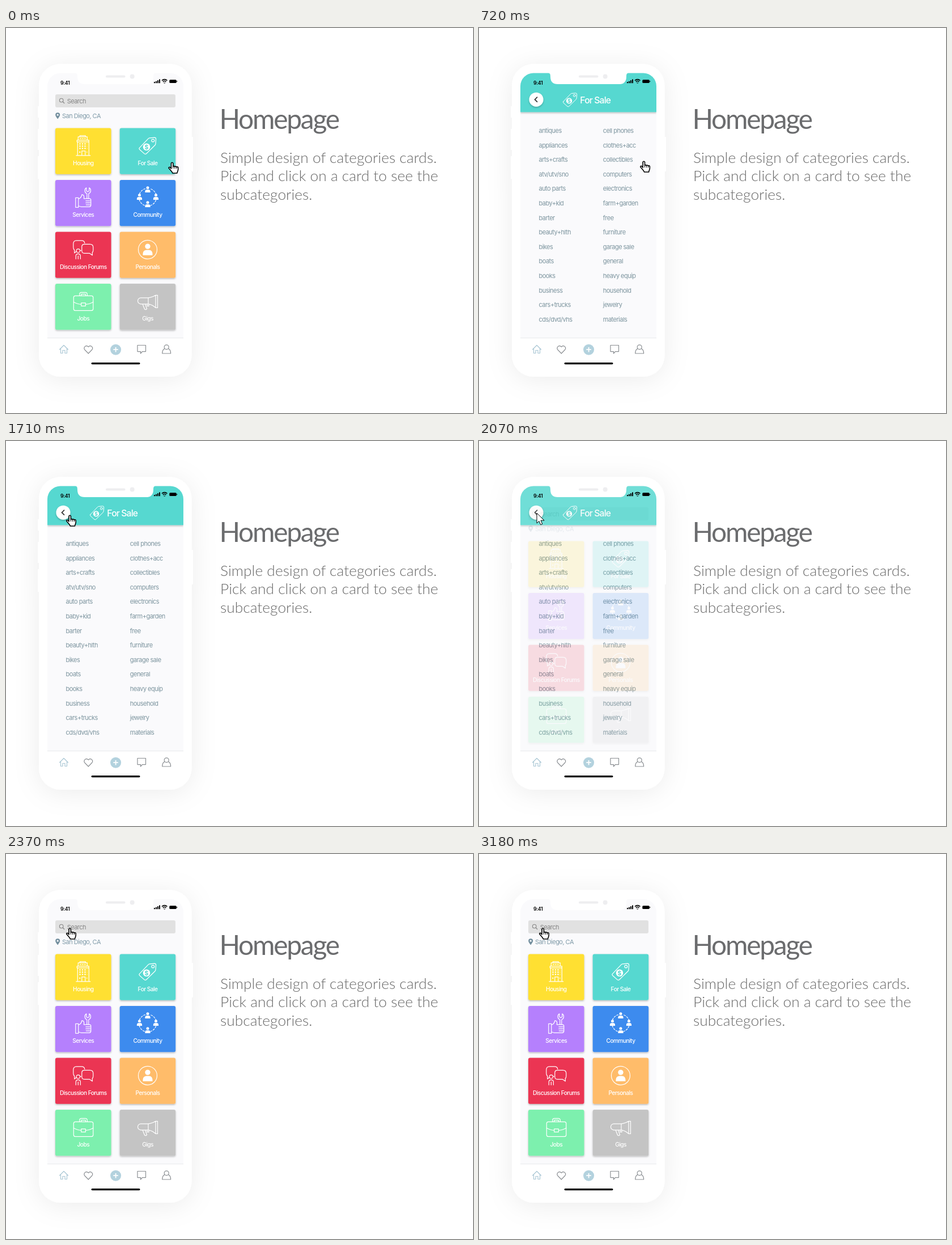
An HTML page for the animation above (3210 ms loop, 824 px wide and 679 px high).

```html
<!DOCTYPE html>
<html lang="en">
<head>
<meta charset="utf-8">
<title>Homepage</title>
<style>
html, body { margin: 0; width: 100%; height: 100%; overflow: hidden; background: #fff; }
svg { display: block; width: 824px; height: 679px; }
text { font-family: Inter, "Liberation Sans", sans-serif; }
.small { font-size: 11px; letter-spacing: -.53px; }
.item { fill: #7d959f; }
.label { font-size: 10.2px; letter-spacing: -.57px; font-weight: 500; fill: #fff; text-anchor: middle; }
.title { font: 400 48px Lato, sans-serif; letter-spacing: -2.3px; fill: #6b6c6e; }
.copy { font: 300 26.4px Lato, sans-serif; fill: #686868; }
.line { fill: none; stroke: #fff; stroke-width: 1.2; stroke-linejoin: round; stroke-linecap: round; }
.tab { fill: none; stroke: #8b8f93; stroke-width: 1.2; stroke-linejoin: round; stroke-linecap: round; }
.solid { fill: #fff; stroke: none; }
.cursor { fill: #fff; stroke: #000; stroke-linejoin: round; stroke-linecap: round; }
</style>
</head>
<body>
<svg viewBox="0 0 824 679">
  <defs>
    <filter id="glow" x="-35%" y="-20%" width="170%" height="140%">
      <feDropShadow dx="0" dy="5" stdDeviation="23" flood-color="#000" flood-opacity=".075"/>
    </filter>
    <filter id="lift" x="-20%" y="-20%" width="140%" height="150%">
      <feDropShadow dx="0" dy="1.5" stdDeviation="1.4" flood-color="#000" flood-opacity=".28"/>
    </filter>
    <clipPath id="screen"><path d="M73 610V102.5a23 23 0 0 1 23-23H290a23 23 0 0 1 23 23V610z"/></clipPath>
    <g id="person"><circle cy="-3.6" r="2.5"/><path d="M-4.6 4.8V3.2a3.4 3.4 0 0 1 3.4-3.4H1.2A3.4 3.4 0 0 1 4.6 3.2V4.8z"/></g>
    <g id="tag">
      <path class="line" d="M-14.5 3.5L1-12.6Q2-13.8 3.6-13.9L12-14.6Q14.6-14.6 14.6-12L14-3.8Q13.9-2.2 12.8-1L-2.5 14Q-4.2 15.4-6 13.8L-14.3 6.4Q-15.6 5-14.5 3.5z"/>
      <circle class="line" cx="9.3" cy="-9.3" r="2.4"/>
      <circle class="solid" cx="-2" cy="2" r="6.3"/>
      <text x="-2" y="5.8" font-size="10.5" font-weight="700" text-anchor="middle" fill="#56d8d0">$</text>
    </g>
  </defs>

  <rect width="824" height="679" fill="#fff"/>
  <g filter="url(#glow)" fill="#fff">
    <rect x="58" y="63.5" width="269.5" height="551.5" rx="38"/>
    <rect x="56" y="138" width="4" height="20" rx="1.5"/>
    <rect x="56" y="178" width="4" height="37" rx="1.5"/>
    <rect x="56" y="226" width="4" height="40" rx="1.5"/>
    <rect x="326" y="192" width="4" height="61" rx="1.5"/>
  </g>

  <g clip-path="url(#screen)">
    <g id="home"></g>
    <g id="list"></g>
    <rect x="73" y="546" width="240" height="1.4" fill="#ebecee"/>
    <rect x="73" y="547.4" width="240" height="60" fill="#fff"/>
  </g>

  <path d="M121 79C125 79 126 81 126 86Q126 99 139 99H247Q260 99 260 86C260 81 261 79 265 79z" fill="#fff"/>
  <rect x="176" y="83.5" width="34.5" height="4" rx="2" fill="#eeeef0"/>
  <circle cx="222.7" cy="85.5" r="4" fill="#eeeef0"/>
  <text x="96" y="100.3" font-size="8.8" font-weight="600" letter-spacing="-.3">9:41</text>
  <path d="M261 95h2v2.2h-2zM264 93.7h2v3.5h-2zM267 92.2h2v5h-2zM270 90.5h2v6.7h-2z"/>
  <g fill="none" stroke="#000" stroke-width="1.5">
    <path d="M275 92.6Q279.7 88.6 284.4 92.6M276.8 94.8Q279.7 92.3 282.6 94.8"/>
    <path d="M278.2 96L279.7 97.6 281.2 96" stroke-width="1"/>
  </g>
  <rect x="288.3" y="91.2" width="12.4" height="5.7" rx="1.5"/>
  <rect x="301.2" y="93" width="1" height="2.2" rx=".5"/>

  <g class="tab">
    <path d="M94.5 567L102 559.5 109.5 567M96.5 565.5V573.5H100V568.5H104V573.5H107.5V565.5" stroke="#aac7d5"/>
    <path d="M145.3 574L139 567.5C135.8 563.5 141.5 557.5 145.3 562.5 149.1 557.5 154.8 563.5 151.6 567.5z"/>
    <path d="M232 559.5H246.5V570.6H240.5L237.5 574V570.6H232z"/>
    <circle cx="283.2" cy="562.8" r="4"/>
    <path d="M279.8 565.6C276.5 567 275.8 569.5 275.8 574H290.6C290.6 569.5 289.9 567 286.6 565.6"/>
  </g>
  <circle cx="193.6" cy="567.2" r="9.5" fill="#b3d2de"/>
  <path d="M189.3 567.2h8.6M193.6 562.9v8.6" stroke="#fff" stroke-width="1.8"/>
  <rect x="150.5" y="589.9" width="86" height="3.4" rx="1.7"/>

  <text class="title" x="376.5" y="178">Homepage</text>
  <text class="copy" x="378" y="238">Simple design of categories cards.</text>
  <text class="copy" x="378" y="270.3">Pick and click on a card to see the</text>
  <text class="copy" x="378" y="302.6">subcategories.</text>

  <g id="pointer">
    <path id="arrow" class="cursor" d="M.5 .5V18L4.5 14.3 7.3 20.7 10.3 19.4 7.5 13.1H13.2z"/>
    <g id="hand" class="cursor" stroke-width="1.6" transform="translate(4.5 3.5)">
      <path d="M5 11.5V2.4a1.7 1.7 0 0 1 3.4 0V8a1.6 1.6 0 0 1 3 .3 1.6 1.6 0 0 1 3 .7 1.5 1.5 0 0 1 2.8 .9V13c0 2.5-1.5 3.5-1.8 6.5H7.5C6.5 16.5 3.5 14 1 11c-1-1.6 .8-2.8 2.2-1.6z"/>
      <path d="M8.4 8v3M11.4 8.5v2.8M14.4 9.3v2.2" stroke-width="1"/>
    </g>
  </g>
</svg>
<script>
const LOOP = 3210;
const byId = id => document.getElementById(id);

const people = [[0, -14], [-14.5, -1], [14.5, -1], [0, 12]]
  .map(([x, y]) => `<use href="#person" class="solid" x="${x}" y="${y}"/>`).join('');

// Each icon is drawn around the middle of its card's picture area.
const icons = {
  housing: `<g class="line" stroke-width="1">
    <path d="M-9-10V-16H7V-10M-6-16V-18H4V-16M-11-10H10V-7H-11zM-10-7V16M10-7V16M-12.5 17H12.5M-2.5 16V9H3.5V16"/>
    <path d="M-7-3.5H7M-7 .5H7M-7 4.5H7M-7 11H-5M6 11H7" stroke-width="2.2" stroke-dasharray="2.4 2.1" stroke-linecap="butt"/>
    <path d="M-6-13H5" stroke-dasharray="2 2"/></g>`,
  sale: '<use href="#tag"/>',
  services: `<g class="line">
    <path d="M-13.5 0H-8.5V17H-13.5zM-8.5 2C-4 1-3-2-2.5-5.5 1-5.5 2-2.5 1 1.5H10.5Q13.5 1.5 13.5 4V13Q13.5 16 10.5 16H-4L-8.5 14.5"/>
    <path d="M4.5 5.5H13M4.5 9H13M5 12.5H13"/>
    <path d="M6.5 1.5V-7C1.5-9.5 2-15.5 5.5-17.5V-12L8-10.5 10.5-12V-17.5C14-15.5 14.5-9.5 9.5-7V1.5"/></g>`,
  community: `<circle class="line" cy="-1" r="15.5" stroke-dasharray="3 2.5 3 2.5 2.7 10.6" stroke-dashoffset="-5.6" stroke-linecap="butt"/>${people}`,
  forums: `<g class="line">
    <path d="M-4 1.5H-10L-15.5 6V1Q-17.5-.5-17.5-4V-10Q-17.5-16 -12-16H-3Q2-16 2.5-11.5"/>
    <path d="M2-9.5H12Q17.5-9.5 17.5-4V1Q17.5 4 16 5V10L11 6.5H2Q-2.5 6.5-2.5 2V-5Q-2.5-9.5 2-9.5z"/>
    <circle cx="-9" cy="2" r="3.2" fill="#eb3452"/>
    <path d="M-13 16.5V11Q-13 7.5-9 7.5T-5 11V16.5M-9 11V16.5"/></g>`,
  personals: `<circle class="line" r="16.5" stroke-width="1.5"/>
    <use href="#person" class="solid" transform="translate(0 1) scale(1.85)"/>`,
  jobs: `<g class="line">
    <rect x="-17" y="-10" width="34.5" height="26" rx="3"/>
    <path d="M-6.5-10V-13Q-6.5-16-3.5-16H4Q7-16 7-13V-10M-3.5-10V-13H4V-10M-17 1Q-10 5-3.5 5M17.5 1Q11 5 4 5M-3.5 2.5H4V8H-3.5z"/></g>`,
  gigs: `<g class="line">
    <path d="M1-6.5H-12A5.5 5.5 0 0 0-12 4.5H1zM1-6.5Q8-7 14-11H17.5V11H14Q8 5.5 1 4.5M14-11V11M-9 4.5L-5.5 13.5Q-3 15.5-1.5 13L-4.5 4.5M-1 4.5V8H2V5"/></g>`
};

const cards = [
  ['Housing', '#ffe033', 'housing'], ['For Sale', '#56d8d0', 'sale'],
  ['Services', '#b580fd', 'services'], ['Community', '#3d8bee', 'community'],
  ['Discussion Forums', '#eb3452', 'forums'], ['Personals', '#ffbc6b', 'personals'],
  ['Jobs', '#7df0ae', 'jobs'], ['Gigs', '#c4c4c4', 'gigs']
];

const columns = [
  'antiques,appliances,arts+crafts,atv/utv/sno,auto parts,baby+kid,barter,beauty+hlth,bikes,boats,books,business,cars+trucks,cds/dvd/vhs',
  'cell phones,clothes+acc,collectibles,computers,electronics,farm+garden,free,furniture,garage sale,general,heavy equip,household,jewelry,materials'
];

function card([name, color, icon], i) {
  const x = 87 + (i % 2) * 113.7, y = 176.5 + (i >> 1) * 91.5;
  return `<rect x="${x}" y="${y}" width="98.5" height="81.3" rx="3" fill="${color}" filter="url(#lift)"/>
    <g transform="translate(${x + 49.3} ${y + 31.3})">${icons[icon]}</g>
    <text class="label" x="${x + 49.3}" y="${y + 65.2}">${name}</text>`;
}

const column = (names, c) => names.split(',').map((name, i) =>
  `<text class="small item" x="${105.5 + c * 113.3}" y="${185 + i * 25.6}">${name}</text>`).join('');

const backdrop = '<rect x="73" y="79" width="240" height="471" fill="#fafafc"/>';

byId('home').innerHTML = `${backdrop}
  <rect x="87" y="117" width="212" height="23" rx="3" fill="#e1e1e1"/>
  <g fill="none" stroke="#858585" stroke-width="1.1"><circle cx="97.7" cy="127.5" r="3.3"/><path d="M100.2 130l3 3"/></g>
  <text class="small" x="107.7" y="132.8" fill="#858585">Search</text>
  <path d="M91.2 160.5C88.5 156.5 87.2 155 87.2 153.2a4 4 0 0 1 8 0C95.2 155 93.9 156.5 91.2 160.5z" fill="#738f9e"/>
  <circle cx="91.2" cy="153.2" r="1.6" fill="#fafafc"/>
  <text class="small" x="99" y="158.7" fill="#7f9aa8">San Diego, CA</text>
  ${cards.map(card).join('')}`;

byId('list').innerHTML = `${backdrop}
  <rect x="73" y="76" width="240" height="72.3" fill="#56d8d0" filter="url(#lift)"/>
  <circle cx="101" cy="126.2" r="12.5" fill="#fff" filter="url(#lift)"/>
  <path d="M103 121.7L98.5 126.2 103 130.7" fill="none" stroke="#333" stroke-width="1.7"/>
  <use href="#tag" transform="translate(160.7 126.8) scale(.82)"/>
  <text x="178.3" y="133" font-size="15.7" font-weight="500" letter-spacing="-.85" fill="#fff">For Sale</text>
  ${columns.map(column).join('')}`;

const ramp = (t, from, to) => Math.min(1, Math.max(0, (t - from) / (to - from)));
const smooth = p => p * p * (3 - 2 * p);
const easeInOut = p => p < .5 ? 4 * p ** 3 : 1 - 4 * (1 - p) ** 3;

function render(t) {
  const shown = easeInOut(ramp(t, 0, 300)) - easeInOut(ramp(t, 1967, 2272));
  byId('list').setAttribute('opacity', shown);

  // The pointer follows a curve from the card to the back button.
  const u = smooth(ramp(t, 650, 1600)), bend = 2 * u * (1 - u);
  const x = 282 - 74 * bend - 180.5 * u * u;
  const y = 233 - 61 * bend - 106 * u * u;
  byId('pointer').setAttribute('transform', `translate(${x} ${y})`);

  const fading = (t >= 30 && t < 345) || (t >= 1960 && t < 2310);
  byId('arrow').style.display = fading ? '' : 'none';
  byId('hand').style.display = fading ? 'none' : '';
}

const start = performance.now();
function tick() {
  render((performance.now() - start) % LOOP);
  requestAnimationFrame(tick);
}
tick();
</script>
</body>
</html>
```
